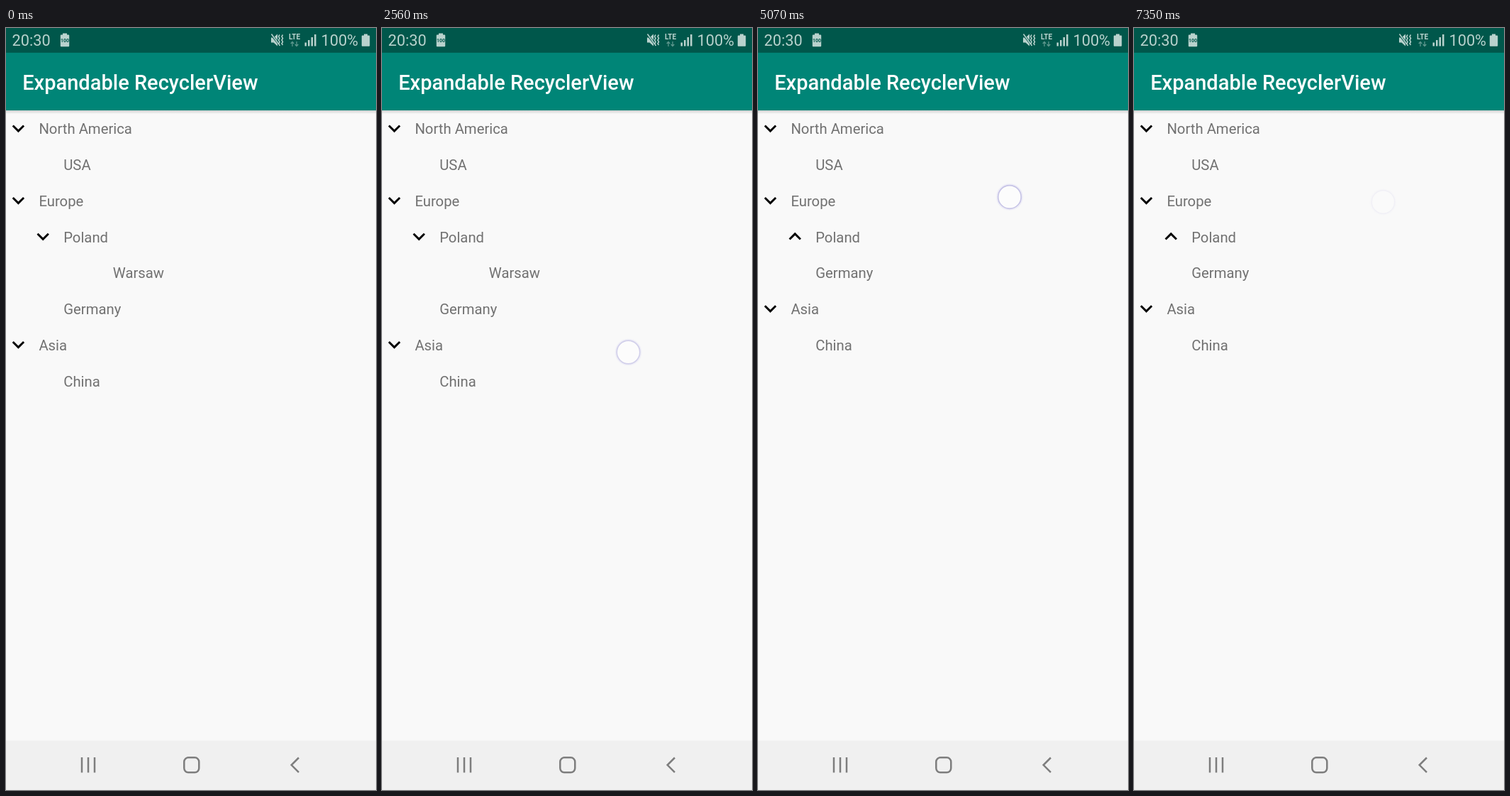
Recreate the animation shown at these times as an HTML page. Size 522 by 1073 pixels, loop 8000 ms.

```html
<!DOCTYPE html>
<html lang="en">
<head>
<meta charset="utf-8">
<title>Expandable list</title>
<style>
  html, body { margin: 0; width: 100%; height: 100%; overflow: hidden; background: #f9f9f9; }
  svg { display: block; width: 100vw; height: 100vh; }
  text { font-family: Roboto, sans-serif; white-space: pre; }
  .row { font-size: 20.3px; fill: #717171; }
  .status { font-size: 21.7px; fill: #b9d2cd; }
  .nav { fill: none; stroke: #7d7d7d; stroke-width: 2.5; }
</style>
</head>
<body>
<svg viewBox="0 0 522 1073" preserveAspectRatio="none">
  <defs>
    <linearGradient id="shade" x1="0" y1="0" x2="0" y2="1">
      <stop offset="0" stop-color="#000" stop-opacity=".16"/>
      <stop offset="1" stop-color="#000" stop-opacity="0"/>
    </linearGradient>
  </defs>
  <rect width="522" height="1073" fill="#f9f9f9"/>
  <g id="list"></g>

  <rect y="116" width="522" height="5" fill="url(#shade)"/>
  <rect y="34" width="522" height="82" fill="#008577"/>
  <text x="23.2" y="86.8" font-size="29" font-weight="500" fill="#fff">Expandable RecyclerView</text>

  <rect width="522" height="34.8" fill="#00574b"/>
  <g fill="#b9d2cd">
    <text class="status" x="8.6" y="25">20:30</text>
    <path d="M80 7.5h6v2h2.2q1 0 1 1v14.700q0 1-1 1h-10.400q-1 0-1-1v-14.700q0-1 1-1h2.200z"/>
    <text x="83" y="20.300" font-size="7" font-weight="700" text-anchor="middle" fill="#00574b">100</text>

    <path d="M374 13.500h3.500l5.500-5v17l-5.500-5h-3.500z"/>
    <path d="M374 8.500l13 16.500" stroke="#00574b" stroke-width="3.200"/>
    <path d="M374.500 8.500l12 16.500M386 9.500l-1.500 2.500 1.500 2.500-1.500 2.500 1.500 2.500-1 2.500M390.500 9.500l-1.500 2.500 1.500 2.500-1.500 2.500 1.500 2.500-1.500 2.500 1.500 2"
      fill="none" stroke="#b9d2cd" stroke-width="1.500"/>

    <text x="407" y="16" font-size="10" font-weight="700" text-anchor="middle">LTE</text>
    <path d="M404 26v-6.500m-2.300 2.500l2.300-2.500 2.300 2.500M410 19v6.500m-2.300-2.500l2.300 2.500 2.300-2.500"
      fill="none" stroke="#5e978d" stroke-width="1.300"/>
    <path d="M421.500 20.500h2.500v5h-2.500zM426 17h2.500v8.500h-2.500zM430.500 13h2.500v12.500h-2.500zM435 9h2.500v16.500h-2.500z"/>
    <text class="status" x="444.500" y="25">100%</text>
    <path d="M505 8.500h5v2h2.200q1 0 1 1v13.200q0 1-1 1h-9.400q-1 0-1-1v-13.200q0-1 1-1h2.200z"/>
  </g>

  <rect y="1003.500" width="522" height="69.500" fill="#f0f0f0"/>
  <path class="nav" d="M107 1027v21.500M116 1027v21.500M125 1027v21.500"/>
  <rect class="nav" x="251.300" y="1027.300" width="21" height="21" rx="6"/>
  <path class="nav" d="M413 1027.500l-10.300 10.300 10.300 10.300"/>

  <g id="touch">
    <circle r="18" fill="none" stroke="#d9d8f2" stroke-opacity=".4" stroke-width="1.500"/>
    <circle r="16.300" fill="#fff" fill-opacity=".6" stroke="#c6c3e6" stroke-width="1.700"/>
  </g>
</svg>
<script>
const LOOP = 8000, TOP = 141.4, STEP = 50.75, DP = 1.45;
const FADE = 120, MOVE = 250, LINGER = 540;
const SVG = "http://www.w3.org/2000/svg";

// label, text inset in dp, has an arrow
const rows = [
  ["North America", 32, true], ["USA", 56], ["Europe", 32, true], ["Poland", 56, true],
  ["Warsaw", 104], ["Germany", 56], ["Asia", 32, true], ["China", 56]
].map(makeRow);

// Each tap toggles one row on release.
const taps = [
  { down: 930, up: 1260, from: [334, 445], to: [334, 445],
    flip: "Asia", fade: ["China"], move: [], shift: 0 },
  { down: 2220, up: 2440, from: [346, 455], to: [347.5, 456.5], opens: true,
    flip: "Asia", fade: ["China"], move: [], shift: 0 },
  { down: 3610, up: 3770, from: [363, 291], to: [363, 291],
    flip: "Poland", fade: ["Warsaw"], move: ["Germany", "Asia", "China"], shift: -1 },
  { down: 5070, up: 5360, from: [355, 238], to: [353, 234.5],
    flip: "Europe", fade: ["Poland", "Germany"], move: ["Asia", "China"], shift: -2 },
  { down: 6550, up: 6890, from: [351.5, 245], to: [351.5, 245], opens: true,
    flip: "Europe", fade: ["Poland", "Germany"], move: ["Asia", "China"], shift: 2 }
];
const touch = document.getElementById("touch");

function add(parent, tag, attrs) {
  const node = document.createElementNS(SVG, tag);
  for (const key in attrs) node.setAttribute(key, attrs[key]);
  return parent.appendChild(node);
}

function makeRow([label, inset, hasArrow], index) {
  const group = add(document.getElementById("list"), "g", {});
  add(group, "text", { class: "row", x: inset * DP, y: 8 }).textContent = label;
  const arrow = hasArrow && add(group, "path", {
    d: "M-4.59-3.41L0 1.17 4.59-3.41 6-2 0 4-6-2z"
  });
  return { label, group, arrow, arrowX: (inset - 20) * DP, index };
}

const clamp = v => Math.min(1, Math.max(0, v));
const ease = v => (1 - Math.cos(Math.PI * clamp(v))) / 2;

function drawRow(row, t) {
  let slot = row.index, alpha = 1, angle = 0;
  for (const tap of taps) {
    const age = t - tap.up;
    if (age < 0) break;
    const moveStart = tap.opens ? 0 : FADE;
    const fadeStart = tap.opens && tap.move.length ? MOVE : 0;
    if (tap.move.includes(row.label)) slot += tap.shift * ease((age - moveStart) / MOVE);
    if (tap.fade.includes(row.label)) {
      const k = ease((age - fadeStart) / FADE);
      alpha = tap.opens ? k : 1 - k;
    }
    if (tap.flip === row.label) angle = tap.opens ? 0 : 180;
  }
  // Rows inside a closed group take the slots left by hidden rows.
  if (row.label === "Germany" && t >= 5360 + FADE) slot = 4;
  row.group.setAttribute("transform", `translate(0 ${TOP + slot * STEP})`);
  row.group.setAttribute("opacity", alpha);
  if (row.arrow) {
    row.arrow.setAttribute("transform", `translate(${row.arrowX} 0) rotate(${angle}) scale(${DP})`);
  }
}

function drawTouch(t) {
  const tap = taps.find(p => t >= p.down && t < p.up + LINGER);
  touch.setAttribute("opacity", tap ? 1 - clamp((t - tap.up) / LINGER) : 0);
  if (!tap) return;
  const k = clamp((t - tap.down) / (tap.up - tap.down));
  const [x, y] = tap.from.map((v, i) => v + (tap.to[i] - v) * k);
  touch.setAttribute("transform", `translate(${x} ${y})`);
}

function draw(t) {
  rows.forEach(row => drawRow(row, t));
  drawTouch(t);
}

const start = performance.now();
function tick() {
  draw((performance.now() - start) % LOOP);
  requestAnimationFrame(tick);
}
draw(0);
requestAnimationFrame(tick);
</script>
</body>
</html>
```
